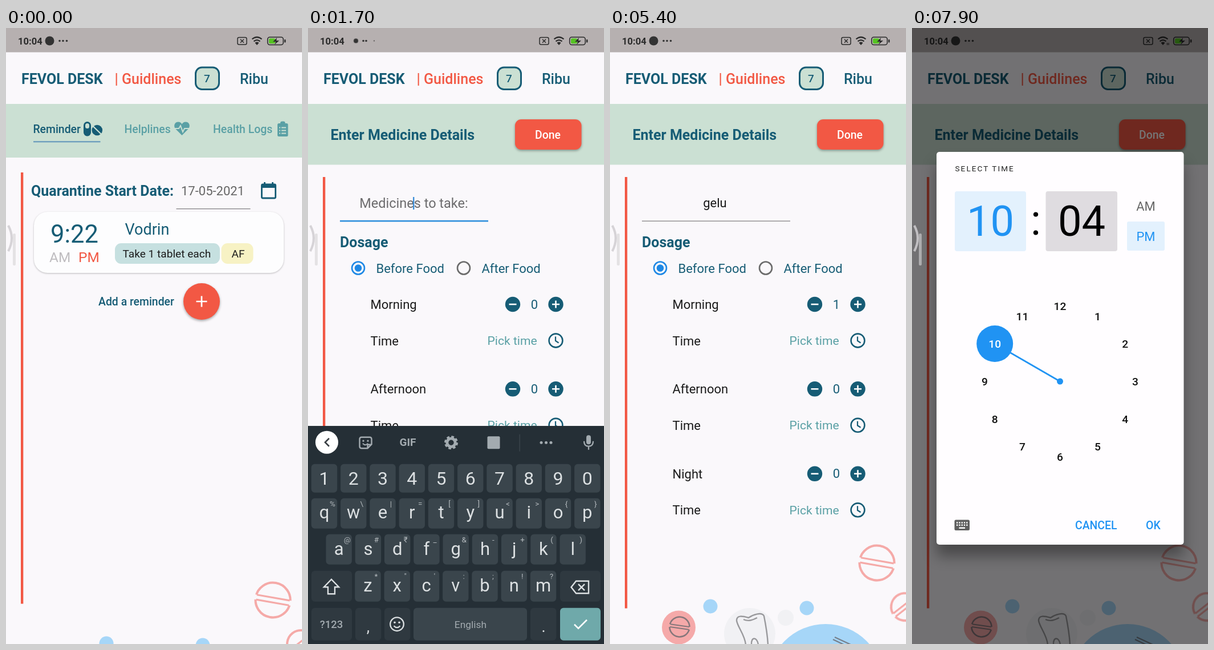
These frames come from a looping animation (519 by 1079 pixels, 8 s). An HTML page:

```html
<!DOCTYPE html>
<html lang="en">
<head>
<meta charset="utf-8">
<title>Medicine reminder</title>
<style>
  html, body { margin: 0; width: 100%; height: 100%; overflow: hidden; background: #faf8fb; }
  svg { display: block; width: 100%; height: 100%; font-family: Roboto, Arial, sans-serif; }
  text { white-space: pre; }
  .m { font-weight: 500; }
  .b { font-weight: 700; }
  .mid { text-anchor: middle; }
  .card { filter: drop-shadow(0 1.5px 1.5px rgba(0,0,0,.25)); }
  .lift { filter: drop-shadow(0 2px 2px rgba(0,0,0,.35)); }
  .sheet { filter: drop-shadow(0 20px 12px rgba(0,0,0,.36)); }

  /* The script sets the time of every animation, so delays are places on the loop. */
  * { animation-play-state: paused !important; }
  .on { animation: on 1ms var(--at) both; }
  .off { animation: off 1ms var(--at) both; }
  .form { animation: fade .3s cubic-bezier(.42,0,1,1) .445s both,
                     rise .3s cubic-bezier(.4,0,.2,1) .445s both; }
  .kb { animation: up .33s cubic-bezier(0,0,.2,1) 1.4s both,
                   down .25s cubic-bezier(.4,0,1,1) 4s forwards; }
  .enter { animation: tint .1s linear 1.7s both; }
  .modal { animation: fade .24s linear 6.92s both; }
  .ripple { transform-box: fill-box; transform-origin: center;
            animation: ripple var(--for, .7s) ease-out var(--at) both; }
  .note { transform-box: fill-box; transform-origin: center;
          animation: squeeze .3s linear 1.6s both, relax .2s linear 4s forwards; }
  .pop { transform-box: fill-box; transform-origin: center; animation: pop .2s ease-out var(--at) both; }

  @keyframes on { from { visibility: hidden } to { visibility: visible } }
  @keyframes off { from { visibility: visible } to { visibility: hidden } }
  @keyframes fade { from { opacity: 0 } to { opacity: 1 } }
  @keyframes rise { from { transform: translateY(259px) } to { transform: none } }
  @keyframes up { from { transform: translateY(386px) } to { transform: none } }
  @keyframes down { from { transform: none } to { transform: translateY(386px) } }
  @keyframes tint { from { fill: #6fa9aa } to { fill: #26a69a } }
  @keyframes pop { from { transform: scale(0) } to { transform: scale(1) } }
  @keyframes ripple {
    0% { transform: scale(.2); opacity: 0 }
    12% { opacity: 1 }
    55% { transform: scale(1); opacity: 1 }
    100% { transform: scale(1); opacity: 0 }
  }
  @keyframes squeeze {
    33.3% { transform: translateX(var(--a)) scale(var(--s)) }
    100% { transform: translateX(var(--b)) scale(.96) }
  }
  @keyframes relax { from { transform: translateX(var(--b)) scale(.96) } to { transform: none } }
</style>
</head>
<body>
<svg id="stage" viewBox="0 0 519 1079"></svg>
<script>
const TEAL = '#165c75', RED = '#f25844', MINT = '#cbe0d3', SEA = '#5aa0a5',
      BLUE = '#2093f3', PAPER = '#faf8fb', KEY = '#3a454c', DIM = '#2f3940', INK = '#dce0e2', SOFT = '#a3abb0';

const esc = s => s.replace(/&/g, '&amp;').replace(/</g, '&lt;');
const txt = (x, y, size, s, fill, cls = '', more = '') =>
  `<text x="${x}" y="${y}" font-size="${size}" fill="${fill}" class="${cls}" ${more}>${esc(s)}</text>`;
const box = (x, y, w, h, fill, r = 0, more = '') =>
  `<rect x="${x}" y="${y}" width="${w}" height="${h}" rx="${r}" fill="${fill}" ${more}/>`;
const dot = (x, y, r, fill, more = '') => `<circle cx="${x}" cy="${y}" r="${r}" fill="${fill}" ${more}/>`;
const line = (d, color, w, more = '') =>
  `<path d="${d}" fill="none" stroke="${color}" stroke-width="${w}" ${more}/>`;
const at = (cls, s) => `class="${cls}" style="--at:${s}s"`;
const swap = (s, before, after) => `<g ${at('off', s)}>${before}</g><g ${at('on', s)}>${after}</g>`;
const ripple = (x, y, r, s) => dot(x, y, r, 'rgba(80,115,95,.13)', at('ripple', s));

const header = box(0, 0, 519, 1079, PAPER) +
  txt(27, 97.5, 25, 'FEVOL DESK', TEAL, 'b') +
  txt(190.5, 97.5, 25, '| Guidlines', RED, 'm') +
  box(332.5, 69, 41, 38.5, MINT, 11, `stroke="${TEAL}" stroke-width="3"`) +
  txt(352.5, 95, 19, '7', TEAL, 'm mid') +
  txt(410, 97.5, 25, 'Ribu', TEAL, 'm');

function tablet(x, y, r, turn, color, w, back) {
  const g = r * .14, e = r * .96;
  return `<g transform="translate(${x} ${y}) rotate(${turn})">` +
    dot(0, 0, r, 'none', `stroke="${color}" stroke-width="${w}"`) +
    box(-r - w, -g, 2 * (r + w), 2 * g, back) +
    line(`M${-e} ${-g}H${e}M${-e} ${g}H${e}`, color, w * .8) + '</g>';
}

const doodles = tablet(468, 937, 30.5, 10, '#f5aaa8', 4, PAPER) +
  tablet(517, 1014, 24, -38, '#f5aaa8', 4, PAPER) +
  dot(176, 1013, 12.5, '#a6d6f8') + dot(345, 1016, 12.5, '#a6d6f8') +
  dot(308, 1033, 14, '#f1f1f4') + dot(245, 1061, 45, '#f1f1f4') +
  dot(120.5, 1050, 29.5, '#f5a9a9') +
  tablet(122, 1049, 17.5, 8, '#86777b', 2.6, '#f5a9a9') +
  dot(378, 1146, 102, '#a6d6f8') +
  line('M391 1071l25 12M394 1067l28 13', '#77808c', 2.4) +
  line('M238 1080C236 1062 224 1050 222 1038C222 1028 232 1030 243 1033C250 1028 266 1022 270 1030C273 1045 276 1062 277 1080M248 1080C247 1066 258 1066 260 1080M234 1036C243 1040 250 1037 258 1033', '#99999c', 2.4);

const pillsIcon = box(136, 164, 13, 25.5, TEAL, 6.5) + box(139, 167, 7, 9, MINT, 3.5) +
  dot(159.8, 179, 9.3, TEAL) + line('M152 171.5L168 187', MINT, 2.2);
const heartIcon = `<path d="M308.500 188L297 176.500C293 171 296 164.500 302 164.500C305.500 164.500 307.500 166.500 308.500 168.500C309.500 166.500 311.500 164.500 315 164.500C321 164.500 324 171 320 176.500Z" fill="${SEA}"/>` +
  line('M295 176H303L306 171L310 182L313 176H322', MINT, 2);
const clipIcon = box(476, 167, 18.5, 23, SEA, 2.5) + box(481, 163.5, 8.500, 7, SEA, 3) +
  line('M479 174.500h2M483 174.500h8M479 179.500h2M483 179.500h8M479 184.500h2M483 184.500h8', MINT, 1.8);

const list = header + box(0, 133, 519, 94, MINT) +
  txt(47.5, 183.5, 19.4, 'Reminder', TEAL, 'm') + pillsIcon + box(48, 198, 117.5, 2.4, '#6f9fbd') +
  txt(207.5, 183.5, 19.4, 'Helplines', SEA, 'm') + heartIcon +
  txt(363, 183.5, 19.4, 'Health Logs', SEA, 'm') + clipIcon +
  `<g transform="translate(0 65)">${doodles}</g>` +
  box(26, 253, 4.3, 755.5, RED) +
  txt(44, 294, 25, 'Quarantine Start Date:', TEAL, 'b') +
  txt(307, 293, 22, '17-05-2021', '#666') + box(298.5, 316, 130, 1.4, '#8d8b8e') +
  box(448.4, 274, 24.2, 24, 'none', 2, `stroke="${TEAL}" stroke-width="2.8"`) +
  box(448, 273, 25, 7, TEAL) + line('M453.500 270v5M467.500 270v5', TEAL, 2.8) +
  box(49, 322, 438, 107, '#fdfdfe', 24, 'class="card"') +
  txt(78, 376, 43.5, '9:22', TEAL) +
  txt(76, 410, 24.4, 'AM', '#bfbdc0') + txt(127, 410, 24.4, 'PM', RED) +
  txt(208.5, 362, 27, 'Vodrin', TEAL) +
  box(191, 377, 184, 36, '#c6e0e0', 11) + txt(204.5, 402, 19.1, 'Take 1 tablet each', '#1c1c1c') +
  box(377.5, 377, 56, 36, '#f7f2c4', 11) + txt(395.5, 402, 19.1, 'AF', '#1c1c1c') +
  txt(162, 486, 19.4, 'Add a reminder', TEAL, 'm') +
  dot(343, 479, 32, RED, 'class="lift"') +
  dot(343, 479, 32, 'rgba(255,255,255,.22)', 'class="ripple" style="--at:.1s;--for:.5s"') +
  line('M333.500 479h19M343 469.500v19', '#fff', 2.7);

function radio(x, s, starts) {
  const ring = c => dot(x, 420.5, 11, 'none', `stroke="${c}" stroke-width="2.6"`);
  const live = more => ring('#1e88e5') + dot(x, 420.5, 6.3, '#1e88e5', more);
  return starts ? swap(s, live(''), ring('#6b6b6b')) : swap(s, ring('#6b6b6b'), live(at('pop', s)));
}

function dose(y, name, count) {
  const ty = y + 63.5;
  return txt(109.5, y + 8, 22, name, '#1a1a1a') +
    dot(359, y, 13.2, TEAL) + line(`M352.500 ${y}h13`, '#fff', 2.6) + count +
    dot(434.5, y, 13.2, TEAL) + line(`M428 ${y}h13M434.500 ${y - 6.5}v13`, '#fff', 2.6) +
    txt(109.5, ty + 8, 22, 'Time', '#1a1a1a') +
    txt(314.5, ty + 7.5, 21.1, 'Pick time', SEA) +
    dot(434.5, ty, 11.9, 'none', `stroke="${TEAL}" stroke-width="2.6"`) +
    line(`M434 ${ty - 7}v7.500l5.500 3.500`, TEAL, 2.2);
}
const count = (y, n) => txt(397, y + 7.5, 22, n, TEAL, 'mid');

const form = header + box(0, 133, 519, 106.5, MINT) +
  txt(39.5, 195.5, 25, 'Enter Medicine Details', TEAL, 'b') +
  box(363, 160, 116.5, 53, RED, 11, 'class="lift"') + txt(420.5, 193.5, 19.4, 'Done', '#fff', 'm mid') +
  doodles + box(26, 261, 4.3, 755.5, RED) +
  `<g ${at('off', 2.1)}>${txt(185.5, 314.5, 23.5, 'Medicines to take:', '#6c6b6d', 'mid')}</g>` +
  txt(184, 314, 22, '', '#1a1a1a', 'mid', 'id="drug"') +
  '<rect id="rule" x="56" width="260"/>' + box(0, 296, 2.4, 22, '#3d8fd8', 0, 'id="caret"') +
  txt(56, 383.5, 25, 'Dosage', TEAL, 'b') +
  radio(88, 5.9, true) + txt(119.5, 428.5, 22, 'Before Food', TEAL) +
  ripple(273, 420.5, 27, 5.7) + radio(273, 5.9, false) + txt(304.5, 428.5, 22, 'After Food', TEAL) +
  ripple(434.5, 484, 46, 4.6) + ripple(434.5, 547.5, 46, 6.6) +
  dose(484, 'Morning', swap(4.9, count(484, '0'), count(484, '1'))) +
  dose(632.3, 'Afternoon', count(632.3, '0')) + dose(780.8, 'Night', count(780.8, '0'));

const PITCH = 51.25;
function keys(x, top, h, base, chars, hints, size = 31) {
  return [...chars].map((c, i) => {
    const cx = x + i * PITCH;
    return box(cx - 22.7, top, 45.4, h, KEY, 6) + txt(cx, base, size, c, INK, 'mid') +
      (hints ? txt(cx + 14.5, top + 14.5, 13.5, hints[i], '#b4babe', 'mid') : '');
  }).join('');
}

const chevron = d => dot(33, 724, 20, '#fff') + line(d, '#3a3f44', 2.6);
const gear = dot(251, 724.5, 7.2, 'none', `stroke="${SOFT}" stroke-width="5"`) +
  dot(251, 724.5, 10.3, 'none', `stroke="${SOFT}" stroke-width="3.4" stroke-dasharray="4.700 3.390"`);
const tools = chevron('M37 717l-7 7l7 7') +
  line('M94 715h14q3.500 0 3.500 3.500v9l-7 7h-10.500q-3.500 0-3.500-3.500v-12.500q0-3.500 3.500-3.500ZM111 728h-6.500v6.500', SOFT, 2.4) +
  dot(97, 721.5, 1.6, SOFT) + dot(105, 721.5, 1.6, SOFT) + line('M96 726q5 5 9 0', SOFT, 2) +
  txt(175, 730.5, 19, 'GIF', SOFT, 'b mid') + gear + box(314.5, 713.5, 22, 22, SOFT, 2) +
  box(370.5, 710, 1.3, 30, '#3d474e') + [409, 417.5, 426].map(x => dot(x, 724.5, 2.5, SOFT)).join('');
const hintBar = chevron('M30 717l7 7l-7 7') +
  [116, 257.5, 399.5].map(x => txt(x, 734, 24, '', INK, 'mid', 'data-word')).join('') +
  box(183, 709, 1.3, 31, '#3d474e') + box(333, 709, 1.3, 31, '#3d474e');

const keyboard = box(0, 695, 519, 390, '#252f36') + swap(2.1, tools, hintBar) +
  box(488, 711.5, 8, 16, SOFT, 4) + line('M484 722q0 9 8 9t8-9M492 731v6', SOFT, 2.3) +
  keys(28.5, 762, 50, 798.5, '1234567890', '', 32) +
  keys(28.5, 822, 53, 857, 'qwertyuiop', '%\\|=[]<>{}') +
  keys(54.2, 885, 53, 921.5, 'asdfghjkl', '@#₹_&-+()') +
  keys(105, 949, 54, 985, 'zxcvbnm', '*"\':;!?') +
  box(6, 949, 71, 54, DIM, 6) + line('M41 964l-13 13.500h7v12h12v-12h7Z', INK, 2.4) +
  box(442, 949, 71, 54, DIM, 6) +
  line('M470 967h22v21.500h-22l-8.500-10.700ZM474 972.500l11 11M485 972.500l-11 11', INK, 2.4) +
  box(6, 1014, 71, 57, DIM, 6) + txt(41, 1049, 18.5, '?123', SOFT, 'm mid') +
  box(83, 1014, 45.4, 57, DIM, 6) + txt(105.5, 1056, 27, ',', INK, 'mid') +
  box(134, 1014, 45.4, 57, DIM, 6) + dot(156, 1042.5, 11.8, 'none', `stroke="${INK}" stroke-width="2.3"`) +
  dot(152, 1039.5, 1.8, INK) + dot(160, 1039.5, 1.8, INK) + line('M150.500 1045.500q5.500 6 11 0', INK, 2.2) +
  box(185, 1014, 199, 57, KEY, 6) + txt(285, 1049, 17.4, 'English', SOFT, 'mid') +
  box(390, 1014, 45.4, 57, DIM, 6) + txt(413, 1056, 27, '.', INK, 'mid') +
  box(442, 1014, 71, 57, '#26a69a', 6, 'class="enter"') + line('M467 1043l7 7l15-15', '#fff', 2.6);

const note = (x, r, a, b, s) =>
  dot(x, 22.5, r, '#333', `class="note" style="--a:${a}px;--b:${b}px;--s:${s}"`);
const status = box(0, 0, 519, 42.5, '#b6b0b0') + txt(21, 28.5, 16.6, '10:04', '#2b2b2b', 'b') +
  note(76.5, 8, 7.5, 5.5, .5) + note(94, 1.8, 3, 1, 1) + note(100, 1.8, 2, 0, 1) + note(106.5, 1.8, 9.5, 7.5, .5) +
  box(406, 16.5, 16, 12.5, 'none', 2.5, 'stroke="#2b2b2b" stroke-width="1.5"') +
  line('M411 19.700l6 6M417 19.700l-6 6', '#2b2b2b', 1.5) +
  line('M431.500 19.500q8.500-7 17 0M434.500 23.300q5.500-4.500 11 0', '#2b2b2b', 2.2) +
  '<path d="M436.500 26q3.500-2.800 7 0l-3.500 4Z" fill="#2b2b2b"/>' +
  line('M447.500 26v4M450 26v4', '#2b2b2b', 1.2, at('on', 5.4)) +
  box(458.7, 16, 27.5, 13.5, 'none', 4, 'stroke="#2b2b2b" stroke-width="1.6"') +
  box(461, 18.3, 11, 9, '#55c322', 2) + '<path d="M475 17l-7 7h5l-2 5l8-7h-5Z" fill="#2b2b2b"/>' +
  box(488, 20, 2.4, 5.5, '#2b2b2b', 1);

// Twelve hours on a ring, the hand on ten.
const hour = n => [259.5 + 132 * Math.sin(n * Math.PI / 6), 619 - 132 * Math.cos(n * Math.PI / 6)];
const [hx, hy] = hour(10);
const dial = line(`M259.500 619L${hx} ${hy}`, BLUE, 2.6) + dot(259.5, 619, 5.5, BLUE) + dot(hx, hy, 32, BLUE) +
  Array.from({ length: 12 }, (_, i) => {
    const [x, y] = hour(i + 1);
    return txt(x, y + 7, 19.2, String(i + 1), i === 9 ? '#fff' : '#111', 'm mid');
  }).join('');
const keyIcon = box(74.5, 861.5, 26.5, 18.5, '#5f5f5f', 2.5) +
  line('M78 866.500h20M78 870.800h20', '#fff', 2.4, 'stroke-dasharray="2.300 2"') + box(82.5, 874.5, 10.500, 2.4, '#fff');
const dialog = box(43, 217, 433.5, 688, '#fffdff', 5, 'class="sheet"') +
  txt(75.5, 251, 13.5, 'SELECT TIME', '#222', '', 'letter-spacing="2.1"') +
  box(75, 286, 125, 105, '#e3f1fd', 4) + txt(137.5, 364, 74, '10', BLUE, 'mid') +
  txt(217, 362, 74, ':', '#000', 'mid') +
  box(234.500, 286, 125.5, 105, '#dfdce0', 4) + txt(297.5, 364, 74, '04', '#000', 'mid') +
  txt(410, 319.5, 22, 'AM', '#666', 'mid') +
  box(377, 339, 66, 51, '#e3f1fd', 3) + txt(410, 373, 22, 'PM', BLUE, 'mid') + dial + keyIcon +
  txt(286, 878, 19.4, 'CANCEL', BLUE, 'm') + txt(410, 878, 19.4, 'OK', BLUE, 'm');

const handle = line('M4 346q12 22 0 45', '#cfcdd0', 4, 'opacity=".85"') +
  box(12, 360, 5, 56, '#d5d3d6', 2, 'opacity=".6"');

const stage = document.getElementById('stage');
stage.innerHTML = `<g>${list}</g><g class="form">${form}</g><g class="kb">${keyboard}</g>${status}` +
  `<g class="modal">${box(0, 0, 519, 1079, 'rgba(0,0,0,.54)')}</g><g class="modal">${dialog}</g>${handle}`;

const LOOP = 8000, STEP = 100, FOCUS = 1300, BLUR = 4000, WORD = 'gelu';
const PRESS = [2100, 2400, 2700, 3100];
const GUESS = [['', '', ''], ['g', 'get', 'go'], ['ge', 'get', 'gem'], ['gel', 'gels', 'get'], ['gelu', 'gale', 'gulp']];
const drug = document.getElementById('drug'), caret = document.getElementById('caret'),
      rule = document.getElementById('rule'), words = [...document.querySelectorAll('[data-word]')];
const motions = document.getAnimations();

function set(el, attrs) {
  for (const k in attrs) el.setAttribute(k, attrs[k]);
}

function draw(t) {
  motions.forEach(m => { m.currentTime = t; });
  const n = PRESS.filter(p => p <= t).length;
  drug.textContent = WORD.slice(0, n);
  words.forEach((w, i) => { w.textContent = GUESS[n][i]; });
  const focused = t >= FOCUS && t < BLUR;
  const since = t - (n ? PRESS[n - 1] : FOCUS);
  set(rule, focused ? { y: 336.8, height: 2.6, fill: '#2f8fdd' } : { y: 337.5, height: 1.4, fill: '#8d8b8e' });
  set(caret, { x: n ? 185 + drug.getComputedTextLength() / 2 : 184, opacity: focused && since % 1000 < 500 ? 1 : 0 });
}

const start = performance.now();
let shown = -1;
function tick() {
  const t = Math.floor((performance.now() - start + 20) / STEP) * STEP % LOOP;
  if (t !== shown) draw(shown = t);
  requestAnimationFrame(tick);
}
tick();
</script>
</body>
</html>
```
